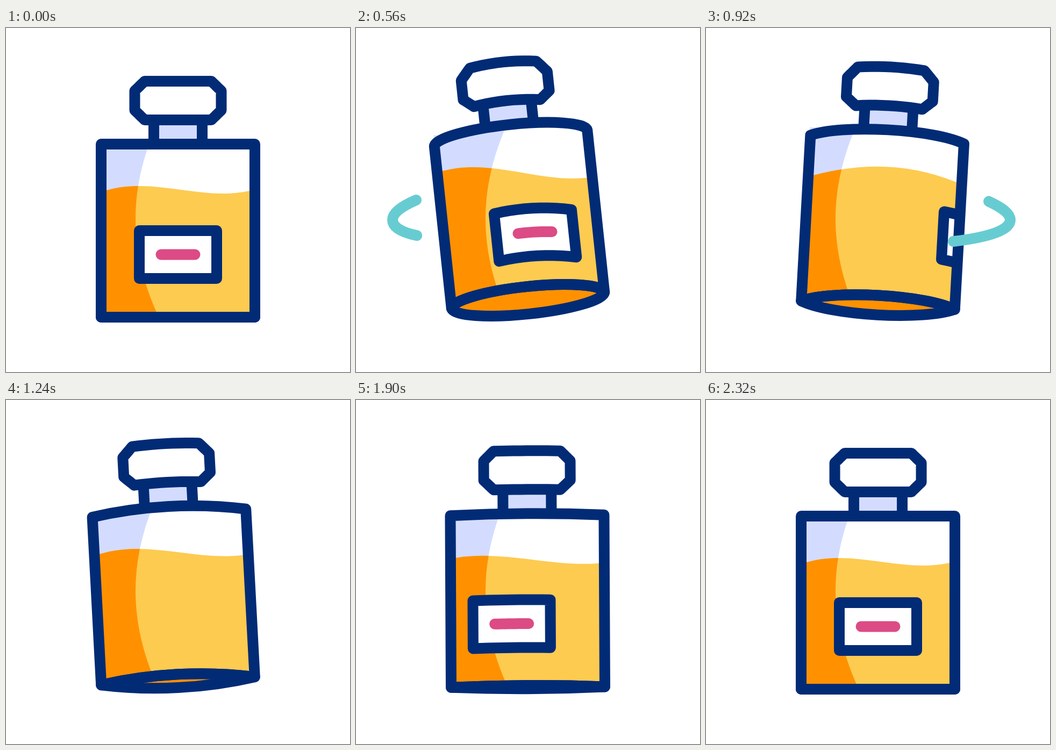
Animation of 640 by 640 pixels, one loop 2400 ms. Source, as an HTML page with a canvas:

```html
<!DOCTYPE html>
<html>
<head>
<meta charset="utf-8">
<title>Spinning bottle</title>
<style>
html, body { margin: 0; height: 100%; overflow: hidden; background: #fff; }
canvas { display: block; }
</style>
</head>
<body>
<canvas id="stage" width="640" height="640"></canvas>
<script>
const ctx = document.getElementById('stage').getContext('2d');
const LOOP = 2400, HALF = 143;
const NAVY = '#022b76', PALE = '#d3dcff', ORANGE = '#ff9100',
  YELLOW = '#fdcb50', TEAL = '#67ccd1', PINK = '#dc4b85';

const clamp = v => Math.max(0, Math.min(1, v));
const smooth = v => (1 - Math.cos(Math.PI * clamp(v))) / 2;

// Eased value from [time, value] pairs
function key(t, keys) {
  let i = 1;
  while (i < keys.length - 1 && t > keys[i][0]) i++;
  const [t0, a] = keys[i - 1], [t1, b] = keys[i];
  return a + (b - a) * smooth((t - t0) / (t1 - t0));
}

const TILT = [[80, 0], [480, -7.9], [820, 5.9], [1130, -5.4], [1470, 4.4], [1780, -2.15], [2080, 3.2], [2330, 0]];
const LABEL_Y = [[80, 116.5], [560, 100], [920, 123], [1640, 125], [1900, 115], [2320, 116.5]];
const SLOPE = [[80, 1], [560, 13], [920, 13], [1240, 2], [1640, 5], [1900, 10], [2320, 1]];
const WAVE_L = [[80, -26], [560, -28], [1240, -28], [1640, -33], [1900, -18], [2320, -26]];
const WAVE_R = [[80, 20], [560, 13], [920, -32], [1240, 12], [1640, -17], [1900, 11], [2320, 20]];

const CAP = [[-62, -117], [62, -117], [80.5, -99], [80.5, -63], [62, -45], [-62, -45], [-80.5, -63], [-80.5, -99]];
const BOX = [[-72, -44.5], [72, -44.5], [72, 44.5], [-72, 44.5]];

const shade = new Path2D('M0 100H305L290 160C258 225 241 290 241 355C241 415 256 478 284 537L300 570H0Z');
const swoosh = new Path2D('M112 320C82 333 68 345 68 357C68 370 84 380 113 386' +
  'C200 405 360 407 460 397C530 389 566 375 566 357C566 345 550 333 520 320');

// Polyline bent upwards around the bottle's axis
function bent(points, bend, dx, dy, centre, closed) {
  const path = new Path2D(), n = points.length;
  for (let i = 0; i < (closed ? n : n - 1); i++) {
    const [x0, y0] = points[i], [x1, y1] = points[(i + 1) % n];
    for (let s = 0; s <= 10; s++) {
      const x = x0 + (x1 - x0) * s / 10 + dx, y = y0 + (y1 - y0) * s / 10 + dy;
      path.lineTo(x, y - bend * (1 - ((x - centre) / HALF) ** 2));
    }
  }
  if (closed) path.closePath();
  return path;
}

// Arc across the full width; dir is 1 for left to right
function arc(path, y, rise, dir) {
  const round = clamp((Math.abs(rise) - 12) / 14);
  const x1 = (95 + 48 * round) * dir, x2 = (48 + 31 * round) * dir;
  const y1 = y - rise * (0.667 - 0.117 * round), top = y - rise;
  path.bezierCurveTo(-x1, y1, -x2, top, 0, top);
  path.bezierCurveTo(x2, top, x1, y1, HALF * dir, y);
}

function paint(path, fill, stroke) {
  if (fill) { ctx.fillStyle = fill; ctx.fill(path); }
  if (stroke) { ctx.strokeStyle = stroke; ctx.stroke(path); }
}

function labelShift(t) {
  return t < 1200
    ? 26 * (Math.max(0, t - 80) / 480) ** 3.5
    : -30 * (Math.max(0, 2330 - t) / 430) ** 3.5;
}

function drawLiquid(t, lift, tilt) {
  const x = 320 + 235.5 * Math.sin(tilt), y = 538 - lift - 235.5 * Math.cos(tilt);
  const d = key(t, SLOPE), l = x - 133, r = x + 133;
  const path = new Path2D();
  path.moveTo(l - 40, 600);
  path.lineTo(l - 40, y - d / 2);
  path.lineTo(l, y - d / 2);
  path.bezierCurveTo(l + 89, y - d / 6 + key(t, WAVE_L), r - 89, y + d / 6 + key(t, WAVE_R), r, y + d / 2);
  path.lineTo(r + 40, y + d / 2);
  path.lineTo(r + 40, 600);
  paint(path, YELLOW);
  ctx.clip(path);
  paint(shade, ORANGE);
}

function drawSwoosh(t) {
  const head = Math.min(642, (t - 480) * 1.45), tail = Math.max(0, (t - 563) * 1.3);
  if (head <= 0 || tail >= 642) return;
  ctx.save();
  ctx.setLineDash([head - tail, 2000]);
  ctx.lineDashOffset = -tail;
  paint(swoosh, null, TEAL);
  ctx.restore();
}

function draw(t) {
  const lift = 31.5 * (Math.max(0, 2340 - t) / 1780) ** 1.5 * smooth((t - 80) / 300);
  const tilt = key(t, TILT) * Math.PI / 180;
  const bend = 0.81 * lift, top = 0.6 * lift - 322;
  const toBottle = () => { ctx.translate(320, 538 - lift); ctx.rotate(tilt); };

  ctx.clearRect(0, 0, 640, 640);
  ctx.lineWidth = 20;
  ctx.lineJoin = ctx.lineCap = 'round';

  // Corner of the shade that peeks out behind the shoulder
  ctx.save();
  toBottle();
  const m = ctx.getTransform();
  ctx.restore();
  ctx.fillStyle = PALE;
  ctx.fillRect(m.a * -HALF + m.c * top + m.e - 1, m.b * -HALF + m.d * top + m.f - 0.65 * lift, 18, 0.65 * lift);

  const body = new Path2D();
  body.moveTo(-HALF, 0);
  body.lineTo(-HALF, top);
  arc(body, top, bend, 1);
  body.lineTo(HALF, 0);
  arc(body, 0, bend, -1);
  body.closePath();

  const base = new Path2D();
  base.moveTo(-HALF, 0);
  arc(base, 0, bend, 1);
  arc(base, 0, -bend, -1);
  base.closePath();

  ctx.save();
  toBottle();
  ctx.save();
  ctx.lineCap = 'butt';
  paint(bent([[-45, -45], [45, -45], [45, 0], [-45, 0]], bend, 0, top, 0, true), PALE);
  for (const x of [-45, 45]) paint(bent([[x, -45], [x, 0]], bend, 0, top, 0), null, NAVY);
  ctx.restore();
  paint(bent(CAP, bend, 0, top, 0, true), '#fff', NAVY);

  ctx.save();
  paint(body, '#fff');
  ctx.clip(body);
  ctx.save();
  ctx.resetTransform();
  paint(shade, PALE);
  drawLiquid(t, lift, tilt);
  ctx.restore();
  const dx = labelShift(t), dy = -key(t, LABEL_Y);
  if (Math.abs(dx) < 240) {
    paint(bent(BOX, bend, dx, dy, dx * 0.2, true), '#fff', NAVY);
    paint(bent([[-31.5, 0], [31.5, 0]], bend, dx, dy, dx * 0.2), null, PINK);
  }
  ctx.restore();

  paint(base, ORANGE, NAVY);
  paint(body, null, NAVY);
  ctx.restore();

  drawSwoosh(t);
}

function frame() {
  draw(performance.now() % LOOP);
  requestAnimationFrame(frame);
}
frame();
</script>
</body>
</html>
```
